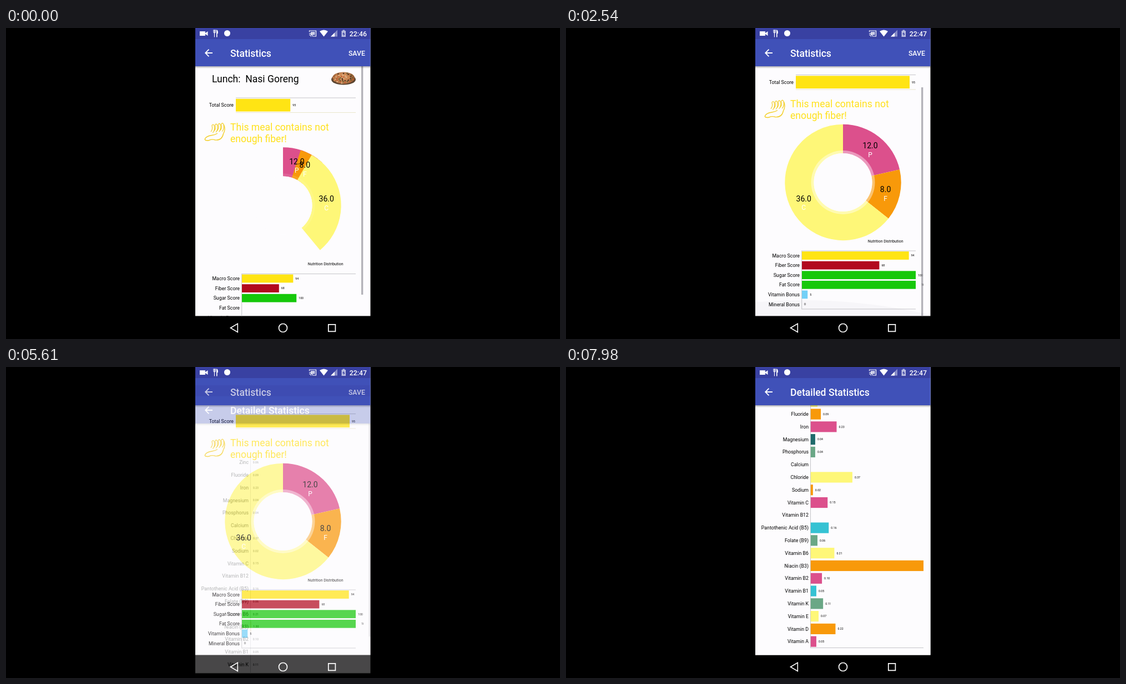
Animation, 998 px wide and 561 px high, one loop 8000 ms. Source, as an HTML page with a canvas:

```html
<!DOCTYPE html>
<html lang="en">
<head>
<meta charset="utf-8">
<title>Meal statistics</title>
<style>
html, body { margin: 0; width: 100%; height: 100%; overflow: hidden; background: #000; }
canvas { display: block; }
</style>
</head>
<body>
<canvas id="stage" width="998" height="561"></canvas>
<script>
const LOOP = 8000, LEFT = 341, RIGHT = 656.5, TOP = 69, BOTTOM = 519.5;
const PAGE = '#fdfcfe', PRIMARY = '#4051b8', DARK = '#3941a2', LINE = '#c6c6ca';
const YELLOW = '#ffe414', PINK = '#dc508c', ORANGE = '#f8990a', LEMON = '#fef778',
      SAGE = '#6aa786', CYAN = '#35c2d3', TEAL = '#1f6a6b', GREEN = '#16c80a';

const stage = document.getElementById('stage').getContext('2d');
const layer = document.createElement('canvas');
layer.width = 998;
layer.height = 561;
const overlay = layer.getContext('2d');
let g = stage;

const scores = [
  ['Macro Score', 94, YELLOW], ['Fiber Score', 68, '#b20a1e'], ['Sugar Score', 100, GREEN],
  ['Fat Score', 103, GREEN], ['Vitamin Bonus', 5, '#73d0f7'], ['Mineral Bonus', 0, GREEN]
];
const slices = [['12.0', 'P', 12, PINK], ['8.0', 'F', 8, ORANGE], ['36.0', 'C', 36, LEMON]];
const nutrients = [
  ['Zinc', .06, LEMON], ['Fluoride', .09, ORANGE], ['Iron', .23, PINK], ['Magnesium', .04, TEAL],
  ['Phosphorus', .04, SAGE], ['Calcium', 0, CYAN], ['Chloride', .37, LEMON], ['Sodium', .02, ORANGE],
  ['Vitamin C', .15, PINK], ['Vitamin B12', 0, CYAN], ['Pantothenic Acid (B5)', .16, CYAN],
  ['Folate (B9)', .06, SAGE], ['Vitamin B6', .21, LEMON], ['Niacin (B3)', 1.3, ORANGE],
  ['Vitamin B2', .1, PINK], ['Vitamin B1', .05, CYAN], ['Vitamin K', .11, SAGE],
  ['Vitamin E', .07, LEMON], ['Vitamin D', .22, ORANGE], ['Vitamin A', .05, PINK]
];

const ramp = (t, from, to) => Math.min(1, Math.max(0, (t - from) / (to - from)));
const ease = (t, from, to) => (1 - Math.cos(Math.PI * ramp(t, from, to))) / 2;

function rect(x, y, w, h, color) {
  g.fillStyle = color;
  g.fillRect(x, y, w, h);
}

// y is the middle of the capitals
function text(str, x, y, size, color = '#000', align = 'left', weight = 400) {
  g.font = `${weight} ${size}px Roboto, sans-serif`;
  g.textAlign = align;
  g.fillStyle = color;
  g.fillText(str, x, y + size * .355);
}

function stroke(d, color, width) {
  g.strokeStyle = color;
  g.lineWidth = width;
  g.stroke(new Path2D(d));
}

function fill(d, color) {
  g.fillStyle = color;
  g.fill(new Path2D(d));
}

function disc(x, y, r, color, ry = r) {
  g.fillStyle = color;
  g.beginPath();
  g.ellipse(x, y, r, ry, 0, 0, 7);
  g.fill();
}

function clipped(x, y, w, h, draw) {
  g.save();
  g.beginPath();
  g.rect(x, y, w, h);
  g.clip();
  draw();
  g.restore();
}

function bar(x, y, w, h, end, color, label) {
  rect(x, y - h / 2, Math.min(w, end - x), h, color);
  clipped(LEFT, y - 10, 644 - LEFT, 20, () => text(label, x + w + 4, y, 5.2));
}

function scrollbar(x, y, h, alpha) {
  rect(x, y, 3.3, h, `rgba(130,130,138,${.6 * alpha})`);
}

function glow(t, start) {
  const a = .026 * ramp(t, start, start + 100) * (1 - ramp(t, start + 100, start + 600));
  if (a > 0) disc(425, 1526, 1035, `rgba(0,0,40,${a})`);
}

function toolbar(title) {
  const shade = g.createLinearGradient(0, TOP, 0, TOP + 4);
  shade.addColorStop(0, 'rgba(0,0,0,.3)');
  shade.addColorStop(1, 'rgba(0,0,0,0)');
  rect(LEFT, TOP, RIGHT - LEFT, 4, shade);
  rect(LEFT, 0, RIGHT - LEFT, 20, DARK);
  rect(LEFT, 20, RIGHT - LEFT, TOP - 20, PRIMARY);
  stroke('M372 45H360M365.5 38.7L359.2 45L365.5 51.3', '#fff', 1.8);
  text(title, 404, 45.5, 17.56, '#fff', 'left', 500);
}

function dish() {
  disc(608, 93, 22, '#5b4430', 9.5);
  const food = g.createRadialGradient(607, 88, 2, 607, 90, 21);
  food.addColorStop(0, '#d79a68');
  food.addColorStop(1, '#92562f');
  disc(608, 90, 20, food, 10.5);
  const tones = ['#e3b384', '#c25a2c', '#6b5a2c', '#54351f', '#d98a4c'];
  for (let i = 0; i < 45; i++) {
    const a = i * 2.4, r = Math.sqrt(i / 45);
    disc(608 + 19 * r * Math.cos(a), 90.5 + 9.5 * r * Math.sin(a), 1.3, tones[i * 3 % 5]);
  }
}

function hand() {
  stroke('M358 201Q360 195 371 193.5Q376 193 381 190M358 201Q360 204 366 202.5' +
    'Q371 200 377 202Q389 203 391.5 191Q396 183 392.5 174.5', '#f3cf2a', 1.4);
  for (let i = 0; i < 4; i++) {
    const x = 369 + i * 5.6, y = 176 - i * .8;
    stroke(`M${x} ${y + 11}Q${x + 4} ${y + 7} ${x + 2} ${y}Q${x + 4} ${y - 4} ${x + 6} ${y}` +
      `Q${x + 8} ${y + 8} ${x + 3.5} ${y + 13}`, '#f3cf2a', 1.2);
  }
}

function sector(from, to, color) {
  const a = from - Math.PI / 2, b = to - Math.PI / 2;
  g.fillStyle = color;
  g.beginPath();
  g.arc(499, 320, 104.7, a, b);
  g.arc(499, 320, 52.5, b, a, true);
  g.fill();
}

// Both the start and the sweep of each slice grow with p
function pie(p) {
  const unit = Math.PI * 2 / 56, labels = [];
  let start = 0;
  for (const [value, name, amount, color] of slices) {
    const sweep = amount * unit;
    sector(start * p * p, start * p * p + sweep * p, color);
    const mid = (start * p + sweep / 2) * p;
    labels.push([value, name, 499 + 78.5 * Math.sin(mid), 320 - 78.5 * Math.cos(mid)]);
    start += sweep;
  }
  disc(499, 320, 57.5, `rgba(255,255,255,${.41 * p * p})`);
  disc(499, 320, 52.5, PAGE);
  for (const [value, name, x, y] of labels) {
    text(value, x, y - 5, 14.05, '#000', 'center');
    text(name, x, y + 11.5, 12, '#fff', 'center');
  }
}

function summary(t) {
  const p = ease(t, -512, 542), scroll = 41.5 * ease(t, 2020, 2420);
  rect(LEFT, 0, RIGHT - LEFT, BOTTOM, PAGE);
  clipped(LEFT, TOP, RIGHT - LEFT, BOTTOM - TOP, () => {
    g.save();
    g.translate(0, -scroll);
    text('Lunch:  Nasi Goreng', 371, 92, 17.56);
    dish();
    rect(414, 125.5, 216, 1, LINE);
    rect(414, 152, 216, 1, '#eae6cb');
    text('Total Score', 410, 139, 8.8, '#000', 'right');
    bar(414, 139.2, 205 * p, 22.8, 630, YELLOW, '95');
    hand();
    text('This meal contains not', 404, 178.5, 17.56, '#ffe11c');
    text('enough fiber!', 404, 199.5, 17.56, '#ffe11c');
    pie(p);
    text('Nutrition Distribution', 607.5, 426, 6.9, '#000', 'right');
    rect(425, 443, 205, 1, LINE);
    rect(425, 548, 205, 1, LINE);
    rect(424.2, 443, 1, 106, LINE);
    scores.forEach(([name, value, color], i) => {
      const y = 452 + i * 17.6;
      text(name, 421, y, 8.8, '#000', 'right');
      if (i < 6 * p) bar(425, y, value * 2.05 * p, 14.8, 630, color, value);
    });
    g.restore();
    const shown = t < 1600 ? 1 - ramp(t, 950, 1200)
      : ramp(t, 2000, 2040) * (1 - ramp(t, 2750, 3000));
    scrollbar(640, TOP + scroll * .916, 412, shown);
    glow(t, 2400);
  });
  toolbar('Statistics');
  text('SAVE', 647, 45.5, 12.3, '#fff', 'right', 500);
}

function details(t) {
  const p = ease(t, 5585, 6585), scroll = 77 * ease(t, 5950, 6320);
  rect(LEFT, 0, RIGHT - LEFT, BOTTOM, PAGE);
  clipped(LEFT, TOP, RIGHT - LEFT, BOTTOM - TOP, () => {
    g.save();
    g.translate(0, -scroll);
    glowFree();
    g.restore();
    glow(t, 6270);
    scrollbar(653.5, TOP + scroll * .857, 384.5, 1 - ramp(t, 6650, 6900));
  });
  toolbar('Detailed Statistics');

  function glowFree() {
    rect(440, 128, 1, 456, LINE);
    rect(440, 583, 204, 1, LINE);
    nutrients.forEach(([name, value, color], i) => {
      const y = 139.2 + i * 22.79;
      text(name, 437, y, 8.8, '#000', 'right');
      if (value) bar(440.8, y, value * 203 * p, 19.2, 644, color, value.toFixed(2));
    });
  }
}

function systemBars(t) {
  rect(349, 6, 10, 8, '#fff');
  fill('M358 10L363.5 6V14Z', '#fff');
  stroke('M374 3V7Q374 9 375.5 9V16.5M375.7 3V8M377.2 3V7Q377.2 9 375.5 9', '#fff', 1.1);
  fill('M379 16.5V3Q382.5 4 381.8 10H380.6V16.5Z', '#fff');
  disc(398.5, 9.5, 5.5, '#fff');
  stroke('M546.5 7V5H558.5V15H553', '#fff', 1.2);
  stroke('M546 9.5A6 6 0 0 1 552 15.5M546 12.3A3.2 3.2 0 0 1 549.2 15.5', '#fff', 1.1);
  rect(549, 7, 7.5, 5.5, 'rgba(255,255,255,.75)');
  fill('M565 6Q572.5 .8 580 6L572.5 15.5Z', '#fff');
  fill('M585 15.5L597 3.5V15.5Z', 'rgba(255,255,255,.4)');
  fill('M585 15.5L592 8.5V15.5Z', '#fff');
  rect(606.5, 3.5, 3.5, 2, '#b9bde0');
  rect(604.5, 5, 7.5, 11, '#b9bde0');
  fill('M608.8 7L606 11.2H608V14.5L610.7 10.2H608.8Z', DARK);
  text(t < 940 ? '22:46' : '22:47', 650, 10.2, 12.3, '#fff', 'right', 500);
  stroke('M404.5 541L417.3 533.3V548.7Z', '#fff', 1.6);
  stroke('M491.5 541A7.5 7.5 0 1 1 506.5 541A7.5 7.5 0 1 1 491.5 541Z', '#fff', 1.7);
  stroke('M580.8 534.8H593.4V547.4H580.8Z', '#fff', 1.7);
}

function frame() {
  const t = performance.now() % LOOP, opened = 5595;
  g = stage;
  rect(0, 0, 998, 561, '#000');
  summary(t);
  if (t > opened) {
    g = overlay;
    g.clearRect(0, 0, 998, 561);
    details(t);
    g = stage;
    g.globalAlpha = 1 - (1 - ramp(t, opened, opened + 200)) ** 4;
    g.drawImage(layer, 0, 41.5 * (1 - ramp(t, opened, opened + 350)) ** 5);
    g.globalAlpha = 1;
  }
  systemBars(t);
  requestAnimationFrame(frame);
}
frame();
</script>
</body>
</html>
```
